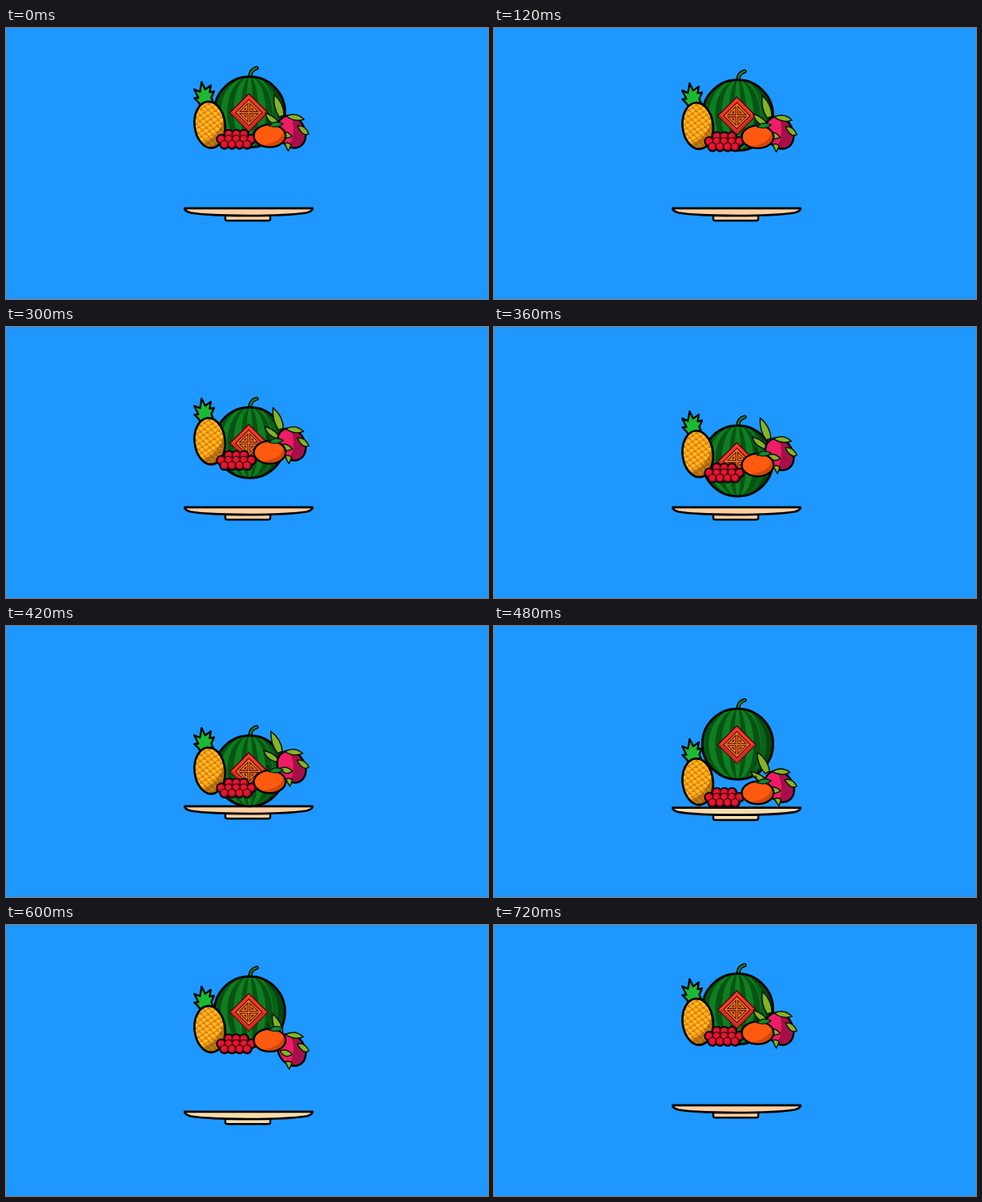
Animation, 600 px wide and 338 px high, one loop 750 ms. Source, as an HTML page:

```html
<!DOCTYPE html>
<html lang="en">
<head>
<meta charset="utf-8">
<title>Fruit toss</title>
<style>
  html, body { margin: 0; width: 100%; height: 100%; overflow: hidden; background: #1e98ff; }
  svg { display: block; width: 600px; height: 338px; }
  .ink { stroke: #000; stroke-width: 2.7; stroke-linejoin: round; stroke-linecap: round; }
  .leaf { fill: #83b428; stroke: #0c1404; stroke-width: 1.5; stroke-linejoin: round; }
  .gold { fill: none; stroke: #ee8a28; stroke-width: 1.2; }
</style>
</head>
<body>
<svg viewBox="0 0 600 338">
  <defs>
    <clipPath id="melonClip"><circle cx="303.3" cy="104.8" r="44.1"/></clipPath>
    <clipPath id="pineClip"><ellipse cx="253.7" cy="120.7" rx="19" ry="29" transform="rotate(-6 253.7 120.7)"/></clipPath>
    <clipPath id="tangClip"><ellipse cx="328.3" cy="134.5" rx="19.8" ry="14.2"/></clipPath>
    <clipPath id="dragonClip"><ellipse cx="355.5" cy="129.5" rx="16.5" ry="21" transform="rotate(-27 355.5 129.5)"/></clipPath>
    <pattern id="scales" width="9" height="7.500" patternUnits="userSpaceOnUse" patternTransform="rotate(6)">
      <rect width="9" height="7.500" fill="#ffc01e"/>
      <path d="M0 0L9 7.500M9 0L0 7.500" stroke="#ee8012" stroke-width="1.600"/>
      <path d="M3.300 4.500H5.700M-1.200 .7H1.200M7.800 .7H10.200" stroke="#b9660e" stroke-width="1.200"/>
    </pattern>
  </defs>

  <g id="plate" class="ink" fill="#ffcfa0">
    <path d="M273 234V238.300Q273 240.300 276 240.300H326Q329 240.300 329 238.300V234Z" stroke-width="2.400"/>
    <path d="M222.500 224.900H381.500Q382 228.500 374 230.500Q352 234 302 234Q252 234 230 230.500Q222 228.500 222.500 224.900Z"/>
  </g>

  <g id="melon">
    <path class="ink" d="M303.800 60Q304.500 52 312 50" fill="none" style="stroke-width:5"/>
    <path d="M303.800 61Q304.500 52 312 50" fill="none" stroke="#149030" stroke-width="2" stroke-linecap="round"/>
    <circle cx="303.300" cy="104.800" r="44.100" fill="#0e7f20"/>
    <g clip-path="url(#melonClip)">
      <g id="stripes" fill="#075313"></g>
      <path d="M314 58Q352 102 310 152H352V58Z" fill="#022b06" opacity=".35"/>
    </g>
    <circle class="ink" cx="303.300" cy="104.800" r="44.100" fill="none"/>
    <g transform="translate(302.300 105.500)">
      <path d="M0-23.500L23.500 0L0 23.500L-23.500 0Z" fill="#f73a2a" stroke="#3c0808" stroke-width="1.300"/>
      <path d="M-23 0L0 23L23 0H19L0 19L-19 0Z" fill="#d02a24"/>
      <path d="M0-17.500L17.500 0L0 17.500L-17.500 0Z" fill="#74130c"/>
      <path class="gold" d="M0-14.500L14.500 0L0 14.500L-14.500 0ZM0-14V14M-14 0H14"/>
      <path class="gold" d="M2.500-8.500V-2.500H8.500ZM-2.500-8.500V-2.500H-8.500ZM2.500 8.500V2.500H8.500ZM-2.500 8.500V2.500H-8.500Z"/>
    </g>
  </g>

  <g id="dragon">
    <path class="leaf" d="M323 106Q325 119 342 123Q339 112 323 106Z"/>
    <g clip-path="url(#dragonClip)">
      <rect x="325" y="100" width="60" height="60" fill="#ee1c66"/>
      <path d="M352 104Q366 130 347 155H380V104Z" fill="#a51048"/>
    </g>
    <ellipse class="ink" cx="355.500" cy="129.500" rx="16.500" ry="21" transform="rotate(-27 355.500 129.500)" fill="none" style="stroke-width:2.400"/>
    <path class="leaf" d="M334 83Q332 99 340 111L346 109Q346 94 334 83Z"/>
    <path class="leaf" d="M349 110Q361 104 371 114Q360 118 349 110Z"/>
    <path class="leaf" d="M363 122Q373 121 377 132Q369 136 363 122Z"/>
    <path class="leaf" d="M341 130Q350 127 356 135Q347 141 341 130Z"/>
    <path class="leaf" d="M347 144Q352 142 355 146L351.500 153.500Q349 150 347 144Z"/>
  </g>

  <g id="pine">
    <path class="ink" fill="#1cb934" style="stroke-width:2.300" d="M242 96L239 92L234.500 87.500L239.500 87L234.300 76.500L241.500 79.500L243.500 67.500L248 76.500L255 71.500L253.500 80L259 79L255.500 87L257.500 91L252 96Z"/>
    <g clip-path="url(#pineClip)">
      <rect x="230" y="88" width="50" height="66" fill="url(#scales)"/>
      <path d="M272 102Q272 134 240 145L250 156H280V102Z" fill="#7a4306" opacity=".5"/>
    </g>
    <ellipse class="ink" cx="253.700" cy="120.700" rx="19" ry="29" transform="rotate(-6 253.700 120.700)" fill="none"/>
  </g>

  <g id="grapes"></g>

  <g id="tang">
    <ellipse cx="328.300" cy="134.500" rx="19.800" ry="14.200" fill="#ff5a0f"/>
    <path clip-path="url(#tangClip)" d="M346 124Q346 143 318 146L322 152H352V124Z" fill="#d4460a"/>
    <ellipse class="ink" cx="328.300" cy="134.500" rx="19.800" ry="14.200" fill="none" style="stroke-width:2.300"/>
    <path d="M328 122Q327.500 118 325.500 114" fill="none" stroke="#0a2a10" stroke-width="2.200" stroke-linecap="round"/>
    <path d="M328 122Q334 114 345 119.500Q338 125.500 328 122Z" fill="#108a30" stroke="#06200c" stroke-width="1.300"/>
  </g>
</svg>
<script>
const LOOP = 750, STEP = 30;
const $ = id => document.getElementById(id);

function add(parent, tag, attrs) {
  const el = document.createElementNS('http://www.w3.org/2000/svg', tag);
  for (const k in attrs) el.setAttribute(k, attrs[k]);
  parent.appendChild(el);
}

// melon stripes: lens bands between two meridians, mirrored
for (const [inner, outer] of [[4, 11], [20, 28], [36, 44]]) {
  for (const side of [0, 1]) {
    add($('stripes'), 'path', {
      d: `M303.3 60.8A${outer} 44 0 0 ${side} 303.3 148.8A${inner} 44 0 0 ${1 - side} 303.3 60.8Z`
    });
  }
}

// grapes: [first x, y, count]
const berries = [[277.5, 132.5, 3], [268, 138.7, 5], [272, 145.2, 4]]
  .flatMap(([x, y, n]) => Array.from({ length: n }, (_, i) => [x + i * 9.4, y]));
for (const [cx, cy] of berries) add($('grapes'), 'circle', { cx, cy, r: 6.6 });
for (const [cx, cy] of berries) {
  add($('grapes'), 'circle', { cx, cy, r: 5.1, fill: '#930d26', stroke: '#240307', 'stroke-width': 1 });
  add($('grapes'), 'circle', { cx: cx - .6, cy: cy - .6, r: 3.6, fill: '#e5162f' });
}

// drop: depth, land: impact time, pow: fall easing, lift/top: rise start and end
const fruits = {
  melon:  { drop: 76,   land: 390, pow: 2.5,  lift: 435, top: 690 },
  dragon: { drop: 69,   land: 480, pow: 3,    lift: 546, top: 720, ride: true, turn: -8 },
  pine:   { drop: 73.5, land: 450, pow: 3,    lift: 480, top: 720 },
  grapes: { drop: 75,   land: 450, pow: 2.47, lift: 480, top: 720 },
  tang:   { drop: 73.5, land: 450, pow: 3,    lift: 480, top: 720 }
};

const dip = [[450, 0], [480, 1.7], [510, 6.5], [540, 11], [570, 12], [600, 8], [630, 4], [660, 1], [690, 0]];
function plateY(t) {
  for (let i = 1; i < dip.length; i++) {
    const [a, y0] = dip[i - 1], [b, y1] = dip[i];
    if (t >= a && t < b) return y0 + (y1 - y0) * (t - a) / (b - a);
  }
  return 0;
}

function fruitY(f, t) {
  if (t < f.land) return f.drop * (t / f.land) ** f.pow;
  const low = f.drop + (f.ride ? plateY(Math.min(t, f.lift)) : 0);
  if (t < f.lift) return low;
  return low * Math.max(0, (f.top - t) / (f.top - f.lift)) ** 3;
}

function draw(t) {
  const p = plateY(t);
  $('plate').setAttribute('transform', `translate(0 ${p})`);
  $('plate').setAttribute('fill', p ? '#f9dcab' : '#ffcfa0');
  for (const id in fruits) {
    const f = fruits[id], y = fruitY(f, t);
    const turn = f.turn ? ` rotate(${f.turn * y / f.drop} 355 130)` : '';
    $(id).setAttribute('transform', `translate(0 ${y})${turn}`);
  }
}

const start = performance.now();
function tick() {
  const t = (performance.now() - start) % LOOP;
  draw(Math.floor(t / STEP) * STEP);
  requestAnimationFrame(tick);
}
tick();
</script>
</body>
</html>
```
